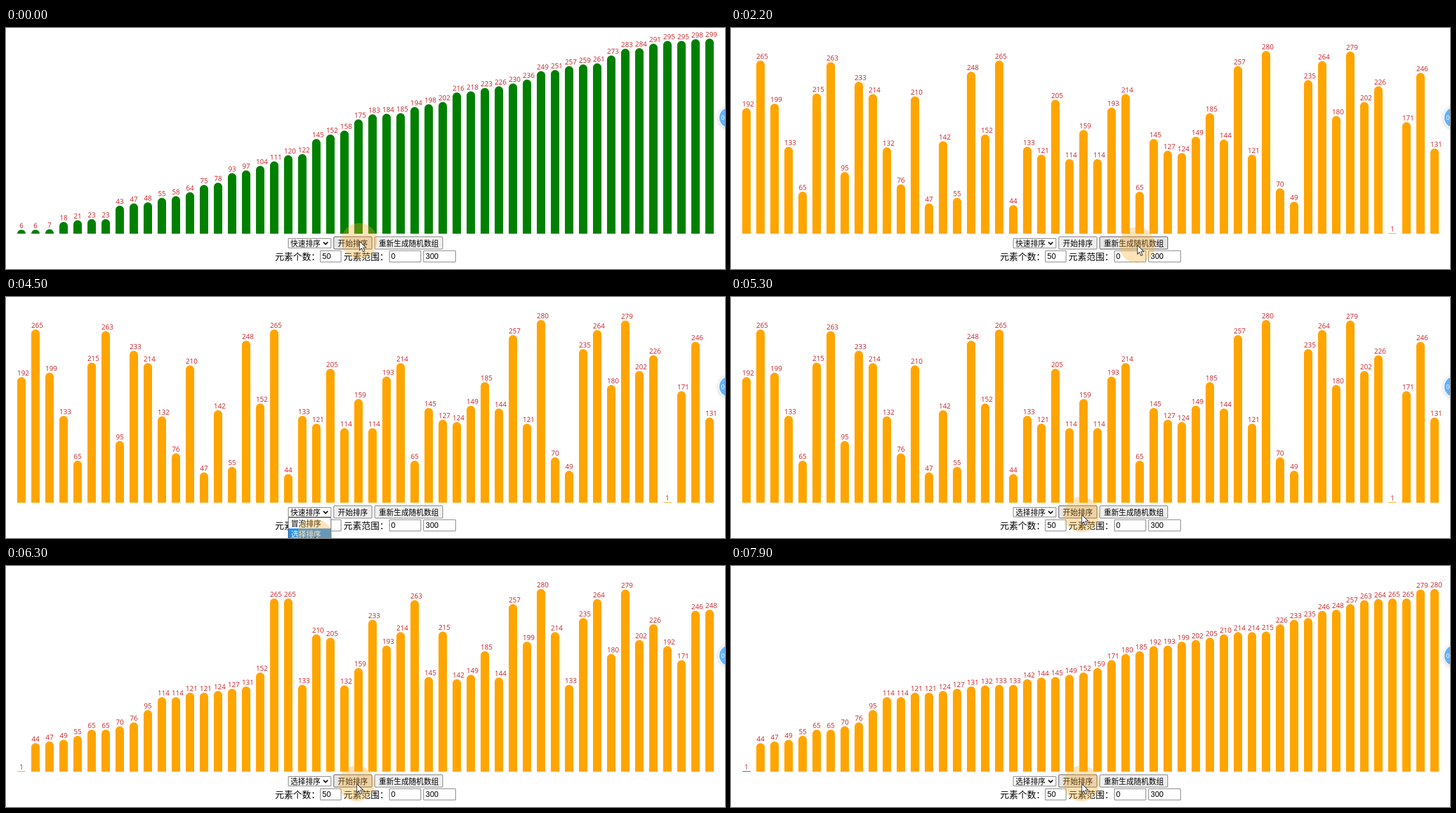
Animation, 1280 px wide and 430 px high, one loop 8000 ms. Source, as an HTML page:

```html
<!DOCTYPE html>
<html lang="zh">
<head>
<meta charset="utf-8">
<title>排序演示</title>
<style>
html, body { margin: 0; width: 100%; height: 100%; overflow: hidden; background: #fff; }
#stage { position: relative; width: 1280px; height: 430px; overflow: hidden; background: #fff;
  font: 13.333px/18px "Noto Sans CJK SC", "Noto Sans CJK", sans-serif; color: #000; }
#stage div { position: absolute; box-sizing: border-box; white-space: nowrap; }

.bar { width: 15px; border-radius: 7.5px 7.5px 0 0; }
.bar span { position: absolute; top: -16px; left: 0; min-width: 15px; text-align: center;
  font: 12.3px/17px "Open Sans", "Noto Sans", sans-serif; color: #c8262b; }

.box { border: 1px solid #767676; background: #fff; border-radius: 1px; }
.button { top: 372px; height: 23px; border: 1px solid #767676; border-radius: 2px;
  background: #efefef; text-align: center; line-height: 21px; animation: 8s step-end infinite; }
.label { top: 395px; font-size: 16px; line-height: 24px; }
.input { top: 397px; height: 21px; padding-left: 3px; font: 13.8px/19px "Liberation Sans", Arial, sans-serif; }

#select { left: 501.5px; top: 375px; width: 77px; height: 18px; padding-left: 4px; line-height: 16px; }
#select svg { position: absolute; right: 4px; top: 5px; }
#start { left: 583px; width: 69px; animation-name: hover-start; }
#renew { left: 656px; width: 122px; animation-name: hover-renew; }

#menu { left: 501.5px; top: 393px; width: 77px; height: 90px; border: 1px solid #555; background: #fff;
  animation: menu 8s step-end infinite; }
#menu div { left: 0; width: 75px; height: 19px; padding-left: 5px; line-height: 19px;
  animation: 8s step-end infinite; }
#menu .first { top: 0; animation-name: pick-first; }
#menu .second { top: 19px; animation-name: pick-second; }

#timer { left: 1270px; top: 142px; width: 36px; height: 36px; border-radius: 50%;
  background: #63b1f6; box-shadow: 0 0 0 2px #f4f8fc, 0 1px 6px 2px #0003;
  color: #fff; padding-left: 3px; font: 11px/36px "Open Sans", sans-serif; }

#cursor { left: 0; top: 0; width: 0; height: 0; animation: move 8s ease-in-out infinite; }
#cursor div { left: -32px; top: -32px; width: 64px; height: 64px; border-radius: 50%;
  background: rgba(250, 170, 40, .33); }
#cursor svg { position: absolute; left: 0; top: 0; overflow: visible; }

@keyframes move {
  0%, 1.25% { transform: translate(629px, 380px); }
  11.25%, 28.125% { transform: translate(723px, 387px); }
  33.125%, 35% { transform: translate(562px, 385px); }
  42.5%, 57.5% { transform: translate(549px, 428px); }
  62.5%, 100% { transform: translate(624px, 388px); }
}
@keyframes hover-start {
  0%, 30.4%, 61.1%, 100% { background: #e5e5e5; border-color: #4f4f4f; }
  4.4%, 32.1% { background: #efefef; border-color: #767676; }
}
@keyframes hover-renew {
  0%, 30.4%, 100% { background: #efefef; border-color: #767676; }
  4.6% { background: #e5e5e5; border-color: #4f4f4f; }
}
@keyframes menu {
  0%, 57.5%, 100% { visibility: hidden; }
  33.75% { visibility: visible; }
}
@keyframes pick-first {
  0%, 39.4%, 100% { background: #fff; color: #000; }
  37.2% { background: #1e90ff; color: #fff; }
}
@keyframes pick-second {
  0%, 100% { background: #fff; color: #000; }
  39.4% { background: #1e90ff; color: #fff; }
}
</style>
</head>
<body>
<div id="stage">
  <div id="bars"></div>
  <div id="select" class="box"><span id="choice">快速排序</span>
    <svg width="10" height="7"><path d="M1 1l4 4 4-4" fill="none" stroke="#111" stroke-width="2"/></svg>
  </div>
  <div id="start" class="button">开始排序</div>
  <div id="renew" class="button">重新生成随机数组</div>
  <div class="label" style="left:479px">元素个数：</div>
  <div class="box input" style="left:559px;width:38px">50</div>
  <div class="label" style="left:601px">元素范围：</div>
  <div class="box input" style="left:681.5px;width:57px">0</div>
  <div class="box input" style="left:743px;width:58px">300</div>
  <div id="menu"><div class="first">冒泡排序</div><div class="second">选择排序</div></div>
  <div id="timer">00</div>
  <div id="cursor">
    <div></div>
    <svg width="14" height="22"><path d="M.5 .5V16.5L4.2 13 6.8 19.2 9.6 18 7 12H12Z" fill="#fff" stroke="#333" stroke-width="1.1"/></svg>
  </div>
</div>
<script>
const LOOP = 8000, RENEW = 2000, CHOOSE = 4600, SORT = 5440, STEP = 50, DONE = 7840;
const FLOOR = 367.4, SCALE = 350 / 300;

const sorted = [6, 6, 7, 18, 21, 23, 23, 43, 47, 48, 55, 58, 64, 75, 78, 93, 97, 104, 111, 120, 122,
  145, 152, 158, 175, 183, 184, 185, 194, 198, 202, 216, 218, 223, 226, 230, 236, 249, 251, 257,
  259, 261, 273, 283, 284, 291, 295, 295, 298, 299];
const shuffled = [192, 265, 199, 133, 65, 215, 263, 95, 233, 214, 132, 76, 210, 47, 142, 55, 248,
  152, 265, 44, 133, 121, 205, 114, 159, 114, 193, 214, 65, 145, 127, 124, 149, 185, 144, 257,
  121, 280, 70, 49, 235, 264, 180, 279, 202, 226, 1, 171, 246, 131];

const choice = document.getElementById('choice');
const bars = sorted.map((_, i) => {
  const bar = document.createElement('div');
  bar.className = 'bar';
  bar.style.left = 20 + 25 * i + 'px';
  bar.append(document.createElement('span'));
  document.getElementById('bars').append(bar);
  return bar;
});

// Selection sort, stopped after the given number of passes
function selectionSort(list, passes) {
  const a = [...list];
  for (let i = 0; i < passes; i++) {
    let min = i;
    for (let j = i + 1; j < a.length; j++) if (a[j] < a[min]) min = j;
    [a[i], a[min]] = [a[min], a[i]];
  }
  return a;
}

const stepsSince = (t, from, max) => Math.max(0, Math.min(max, Math.floor((t - from) / STEP)));

let shown = '';
function draw(t) {
  const renewed = t >= RENEW;
  const passes = stepsSince(t, SORT, 49);
  const green = renewed ? stepsSince(t, DONE, 50) : 50;
  choice.textContent = t >= CHOOSE ? '选择排序' : '快速排序';

  const key = [renewed, passes, green].join();
  if (key === shown) return;
  shown = key;
  const values = renewed ? selectionSort(shuffled, passes) : sorted;
  bars.forEach((bar, i) => {
    const h = values[i] * SCALE;
    bar.style.top = FLOOR - h + 'px';
    bar.style.height = h + 'px';
    bar.style.background = i < green ? '#008000' : '#ffa500';
    bar.firstChild.textContent = values[i];
  });
}

let origin;
function tick(now) {
  origin ??= now;
  draw((now - origin) % LOOP);
  requestAnimationFrame(tick);
}
draw(0);
requestAnimationFrame(tick);
</script>
</body>
</html>
```
